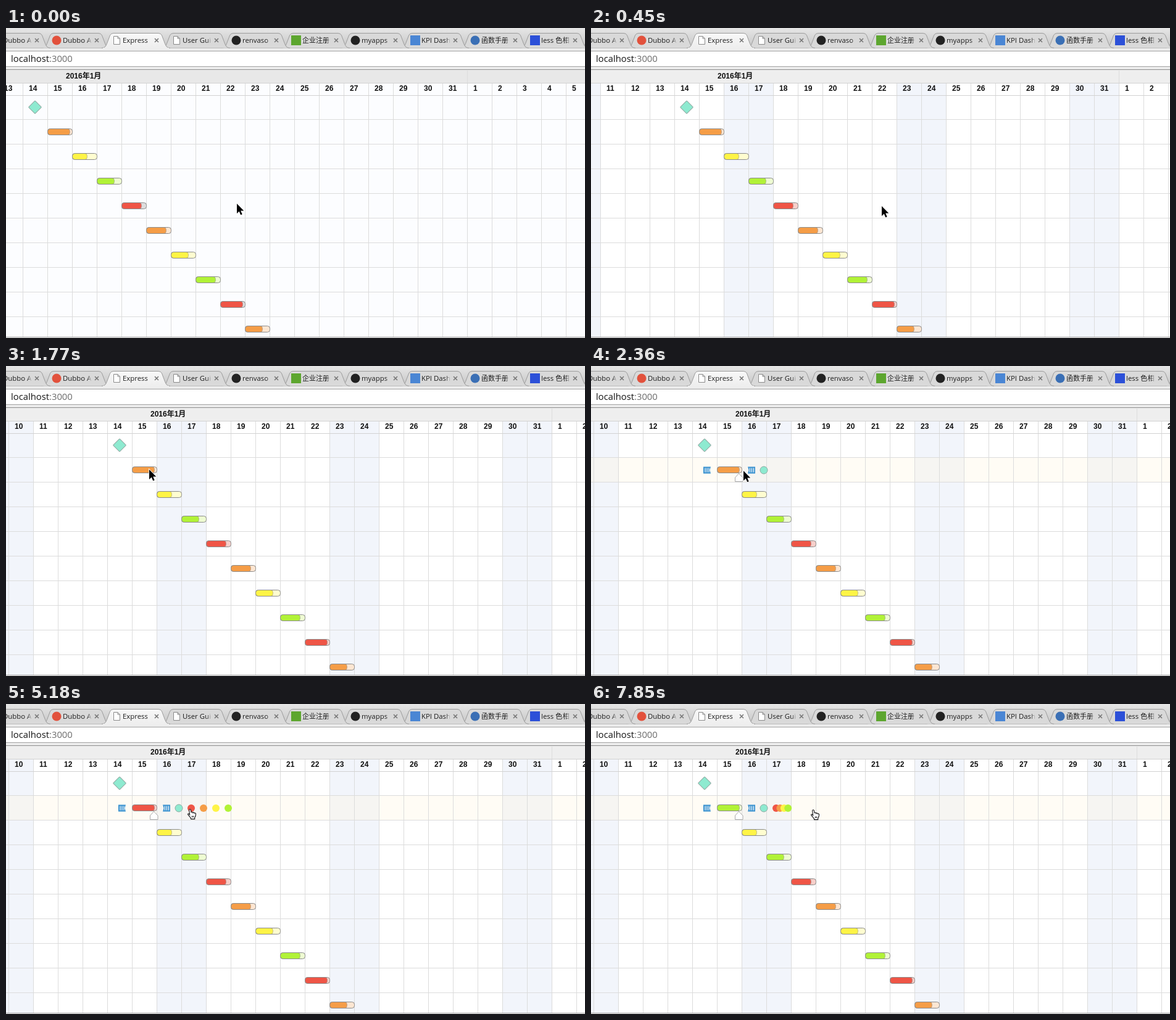
An HTML page that plays this animation: 938 px wide and 503 px high, repeating every 8000 ms.

```html
<!DOCTYPE html>
<html lang="zh">
<head>
<meta charset="utf-8">
<title>Gantt chart</title>
<style>
  html, body { margin: 0; width: 100%; height: 100%; overflow: hidden; background: #fff; }
  svg { display: block; width: 938px; height: 503px; }
  .tab-text { font: 11.4px "Open Sans", "Noto Sans CJK SC", "Noto Sans CJK", sans-serif; }
  .cjk { font-size: 11px; }
  .url { font: 14.8px "Open Sans", sans-serif; }
  .label { font: bold 12px "Liberation Sans", "Noto Sans CJK SC", "Noto Sans CJK", sans-serif; fill: #111; }
  .sheet { fill: #fff; }
  .head { fill: #eee; }
  .weekend { fill: #f2f5fb; }
  .line { stroke: #dcdcdc; }
  .edge { fill: none; stroke: #8c8c8c; }
  .faded .sheet { fill: #fcfdff; }
  .faded .head { fill: #e8e8e8; }
  .faded .weekend { fill: none; }
  .faded .rest { fill: #f8f3d2; }
  .faded .rest.red { fill: #ddd; }
  .orange { fill: #f59d47; }
  .yellow { fill: #fff446; }
  .green { fill: #b1f237; }
  .red { fill: #ef5546; }
  .teal { fill: #8eead0; }
  .rest.orange { fill: #fde6d2; }
  .rest.yellow { fill: #fffdd0; }
  .rest.green { fill: #eefcd2; }
  .rest.red { fill: #f6cfca; }
</style>
</head>
<body>
<svg id="stage" viewBox="0 0 938 503">
  <defs>
    <linearGradient id="strip" x2="0" y2="1">
      <stop stop-color="#e6e6e6"/><stop offset="1" stop-color="#c6c6c6"/>
    </linearGradient>
    <linearGradient id="front" x2="0" y2="1">
      <stop stop-color="#f8f8f8"/><stop offset="1" stop-color="#eee"/>
    </linearGradient>
    <linearGradient id="fade" gradientUnits="userSpaceOnUse" x1="39" x2="47" y1="0" y2="0">
      <stop stop-color="#1c1c1c"/><stop offset="1" stop-color="#1c1c1c" stop-opacity="0"/>
    </linearGradient>
  </defs>

  <rect class="sheet" width="938" height="503"/>
  <g id="scroll"></g>
  <g id="rows"></g>
  <g id="tasks"></g>

  <g id="tools">
    <g fill="#3a92d0">
      <path d="M182 163.500H194L192.300 169L194 174.500H182Z"/>
      <path d="M254 163.500H266V174.500H254L255.700 169Z"/>
    </g>
    <path d="M185 165.500v7M188 165.500v7M191 165.500v7M257.500 165.500v7M260.500 165.500v7M263.500 165.500v7" stroke="#fff" stroke-width="1.200"/>
    <path d="M239.500 174.500L246 181V187.500H233.500V181Z" fill="#fff" stroke="#aaa"/>
    <circle class="teal" cx="280" cy="169" r="6" stroke="#8aa9a0"/>
  </g>
  <g id="menu"></g>

  <g id="chrome">
    <rect width="938" height="33" fill="url(#strip)"/>
    <rect y="32" width="938" height="37" fill="#ececec"/>
    <path d="M0 32.500H938" stroke="#a2a2a2"/>
    <g id="tabs"></g>
    <rect x="-5" y="37.500" width="950" height="25" fill="#fff" stroke="#a4a4a4"/>
    <path d="M0 67.500H938" stroke="#8f8f8f"/>
    <text class="url" x="8" y="55" fill="#151515">localhost<tspan fill="#6a6a6a">:3000</tspan></text>
  </g>
  <rect y="501" width="938" height="1" fill="#a5a5a5"/>
  <rect y="502" width="938" height="1" fill="#e6e6e6"/>

  <path id="arrow" d="M0 0V16L3.700 12.600L6.200 18.300L8.700 17.200L6.200 11.600H11.300Z" stroke="#fff" stroke-width="1.600" paint-order="stroke"/>
  <path id="hand" d="M3.600 9.500L2.700 2.600C2.500 .4 5 .2 5.400 2.200L6.200 6.200C6.600 4.900 8.600 5 8.800 6.500C9.400 5.500 11 5.800 11.200 7.200C12 6.400 13.500 7 13.500 8.400C13.500 11 13 12.500 11.700 14.200V16.600H5.600L5.200 14.600C3.600 12.800 2.200 11.400 .8 9.400C.2 8 1.900 7.400 2.800 8.600ZM7.500 11.500v2.500M9.500 11.500v2.500" fill="#fff" stroke="#111" stroke-width="1.100"/>
</svg>
<script>
const $ = id => document.getElementById(id);
const el = (parent, tag, attrs, text) => {
  const node = document.createElementNS('http://www.w3.org/2000/svg', tag);
  for (const key in attrs) node.setAttribute(key, attrs[key]);
  if (text) node.textContent = text;
  return parent.appendChild(node);
};
const dayX = day => 27 + (day - 14) * 40;

// Browser tabs
const tabs = [
  ['Dubbo Admin'], ['Dubbo Admin', 'dot', '#e2513c'], ['Express', 'page'], ['User Guide', 'page'],
  ['renvaso', 'dot', '#222'], ['企业注册', 'box', '#5da62f'], ['myapps', 'dot', '#222'],
  ['KPI Dashboard', 'box', '#4a86d4'], ['函数手册', 'dot', '#3a6fb5'], ['less 色相', 'box', '#2c50d8'], ['']
];
function drawTab(i) {
  const [title, icon, color] = tabs[i], active = i === 2;
  const g = el($('tabs'), 'g', { transform: `translate(${-5 + Math.round(96.9 * i)} 0)` });
  el(g, 'path', {
    d: 'M-34 32.500C-28 32 -27 29 -25 24L-20.500 12Q-19 8.500 -15 8.500H58Q62 8.500 63.500 12L68 24C70 29 71 32 77 32.500',
    fill: active ? 'url(#front)' : '#d9d9d9', stroke: '#9c9c9c'
  });
  if (active) el(g, 'rect', { x: -32, y: 32, width: 107, height: 2, fill: '#eee' });
  if (icon === 'dot') el(g, 'circle', { cx: -10, cy: 20, r: 7.500, fill: color });
  if (icon === 'box') el(g, 'rect', { x: -18, y: 12, width: 16, height: 16, fill: color });
  if (icon === 'page') el(g, 'path', { d: 'M-14.500 13.500H-8L-4.500 17V26.500H-14.500ZM-8 13.500V17H-4.500', fill: '#fff', stroke: '#8a8a8a' });
  if (!title) return;
  const cjk = title.charCodeAt(0) > 999;
  el(g, 'text', { class: 'tab-text' + (cjk ? ' cjk' : ''), y: 24, fill: 'url(#fade)' }, title);
  el(g, 'path', { d: 'M52 17l6 6m0 -6l-6 6', stroke: '#777', 'stroke-width': 1.600 });
}
for (let i = tabs.length - 1; i >= 0; i--) if (i !== 2) drawTab(i);
drawTab(2);

// Calendar grid
const scroll = $('scroll');
el(scroll, 'rect', { class: 'head', x: -300, y: 69, width: 1400, height: 20 });
for (let day = 9; day <= 37; day++) {
  const x = dayX(day);
  if (day % 7 === 2 || day % 7 === 3) el(scroll, 'rect', { class: 'weekend', x, y: 90, width: 40, height: 411 });
}
const highlight = el(scroll, 'rect', { x: -300, y: 149, width: 1400, height: 39, fill: '#fff3d6', opacity: .25 });
for (let day = 9; day <= 37; day++) {
  const x = dayX(day);
  el(scroll, 'path', { class: 'line', d: `M${x + .5} ${day === 32 ? 69 : 90}V501` });
  el(scroll, 'text', { class: 'label', x: x + 10, y: 102 }, String(day > 31 ? day - 31 : day));
}
el(scroll, 'text', { class: 'label', x: 97, y: 82 }, '2016年1月');
for (const y of [89, 109]) el($('rows'), 'path', { d: `M0 ${y + .5}H938`, stroke: '#d2d2d2' });
for (let y = 148.5; y < 500; y += 40) el($('rows'), 'path', { class: 'line', d: `M0 ${y}H938` });

// Milestone and task bars
const hues = ['orange', 'yellow', 'green', 'red'];
const progress = [36, 24, 28, 32, 32, 28, 32, 36, 28];
el($('tasks'), 'rect', {
  class: 'teal', x: -7.500, y: -7.500, width: 15, height: 15, rx: 1, stroke: '#93aaa4',
  transform: 'translate(47 128.500) rotate(45)'
});
const bars = progress.map((done, i) => {
  const x = dayX(15 + i) + .5, y = 163.5 + 40 * i, hue = hues[i % 4];
  const box = { x, y, width: 40, height: 10, rx: 4 };
  const rest = el($('tasks'), 'rect', { ...box, class: 'rest ' + hue });
  const fill = el($('tasks'), 'rect', { ...box, width: done, class: hue, stroke: '#999', 'stroke-width': .6 });
  el($('tasks'), 'rect', { ...box, class: 'edge' });
  return { rest, fill };
});
const dots = ['red', 'orange', 'yellow', 'green'].map(hue =>
  el($('menu'), 'circle', { class: hue, cx: 300, cy: 169, r: 6 }));

// Tracks: [tick, values...]
const TICKS = 54, LOOP = 8000;
const scrollTrack = [[0, 0], [1, 30], [3, 108], [4, 137]];
const cursorTrack = [
  [0, 374, 285], [3, 471, 289], [4, 500, 290], [6, 288, 289], [7, 288, 289], [12, 232, 168], [15, 232, 168],
  [18, 276, 175], [20, 276, 175], [25, 297, 174], [27, 317, 173], [29, 299, 171], [30, 299, 171], [32, 294, 170],
  [36, 294, 170], [40, 276, 170], [44, 276, 170], [47, 302, 177], [50, 356, 173], [52, 356, 171]
];
const menuTrack = [[20, 0], [23, 1], [35, 1], [36, .32], [37, 0], [44, 0], [47, 1], [52, 1], [53, .32]];

function at(track, tick) {
  const i = track.findIndex(key => key[0] > tick);
  if (i === 0) return track[0].slice(1);
  if (i < 0) return track[track.length - 1].slice(1);
  const a = track[i - 1], b = track[i], p = (tick - a[0]) / (b[0] - a[0]);
  return a.slice(1).map((v, k) => v + (b[k + 1] - v) * p);
}
const show = (node, on) => node.setAttribute('visibility', on ? 'visible' : 'hidden');

function draw(time) {
  const tick = Math.min(TICKS - 1, Math.floor((time % LOOP + 20) * TICKS / LOOP));
  const [shift] = at(scrollTrack, tick), [spread] = at(menuTrack, tick);
  const [x, y] = at(cursorTrack, tick).map(Math.round);
  const move = `translate(${Math.round(shift)} 0)`;
  scroll.setAttribute('transform', move);
  $('tasks').setAttribute('transform', move);
  $('stage').classList.toggle('faded', tick === 0);

  const hover = tick >= 13;
  show(highlight, hover);
  show($('tools'), hover);
  show($('menu'), tick >= 20 && tick <= 37 || tick >= 44);
  dots.forEach((dot, i) => dot.setAttribute('cx', 300 + 20 * i * spread));

  const hue = tick >= 52 ? 'green' : tick >= 35 ? 'red' : 'orange';
  bars[0].fill.setAttribute('class', hue);
  bars[0].rest.setAttribute('class', 'rest ' + hue);

  for (const id of ['arrow', 'hand']) {
    show($(id), (id === 'hand') === (tick >= 17));
    $(id).setAttribute('transform', `translate(${x} ${y})`);
  }
}
const start = performance.now();
function loop() {
  draw(performance.now() - start);
  requestAnimationFrame(loop);
}
loop();
</script>
</body>
</html>
```
